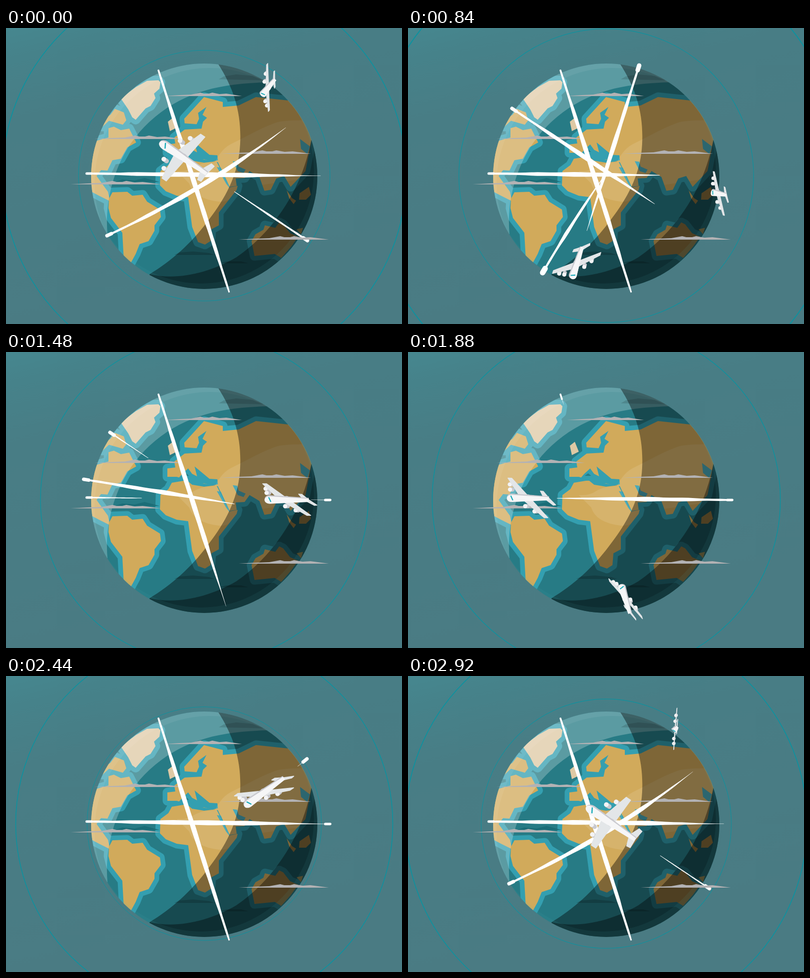
Write an HTML page that moves like this. It is 800 by 600 pixels and loops after 2.96 s.

```html
<!DOCTYPE html>
<html lang="en">
<head>
<meta charset="utf-8">
<title>Flights around the globe</title>
<style>
html, body { margin: 0; width: 100%; height: 100%; overflow: hidden; background: #487c84; }
svg { display: block; width: 100vw; height: 100vh; }
</style>
</head>
<body>
<svg viewBox="0 0 800 600">
  <defs>
    <linearGradient id="sky" gradientUnits="userSpaceOnUse" x1="0" y1="0" x2="145" y2="600">
      <stop offset="0" stop-color="#46878f"/>
      <stop offset=".1" stop-color="#46828a"/>
      <stop offset=".3" stop-color="#487d85"/>
      <stop offset="1" stop-color="#4a7b83"/>
    </linearGradient>
    <clipPath id="disc"><circle cx="400.5" cy="300.5" r="228.5"/></clipPath>
    <clipPath id="landClip"><use href="#eurasia"/><use href="#africa"/></clipPath>
    <path id="cloud" d="M0 8L35 6 62 5 84 1 92 3 104 3 112 1 129 4 145 3 160 5 182 8Z"/>
  </defs>
  <rect width="800" height="600" fill="url(#sky)"/>
  <g id="rings" fill="none" stroke="#0d929f"></g>
  <g clip-path="url(#disc)">
    <rect x="170" y="70" width="460" height="460" fill="#277b85"/>
    <g fill="#d1aa5b" stroke="#349fb0" stroke-width="19" stroke-linejoin="round">
      <path id="greenland" d="M285 107L308 106 312 110 310 123 299 133 302 142 292 158 282 163 262 186 255 181 247 165 232 143 262 120Z"/>
      <path id="arctic" d="M220 164L238 171 243 187 236 196 208 188 195 200 190 188 211 176Z"/>
      <path id="namerica" d="M207 203L218 200 232 207 249 204 263 232 245 242 232 265 215 268 205 289 192 288 183 300 206 332 210 351 188 340 160 325V235L207 222Z"/>
      <path id="samerica" d="M208 346L215 333 245 332 255 340 276 338 285 352 311 368 313 383 300 400V411L288 432 270 438 262 458 250 480 238 470 235 415 212 385 207 365Z"/>
      <path id="africa" d="M328 278L335 265 365 260 376 269 400 273 425 270 440 300 452 323 468 320 466 328 430 374V400L415 408 413 432 402 439 388 434 376 403 368 343 345 340 323 331 311 319 312 290Z"/>
      <path id="eurasia" d="M326 253V236L342 234 340 222 362 205 360 184 400 140 438 150V160L470 157 505 140 580 148 640 190V232L617 228 605 290 575 322 562 300 546 305 535 328 522 330 512 302 492 290 482 304 464 305 466 320 452 322 428 272 376 262 345 253Z"/>
      <path id="australia" d="M496 432L504 418 520 409 523 400 544 405 552 394 560 398 574 416 590 423 576 443 556 466 543 458 502 462Z"/>
    </g>
    <g fill="#d1aa5b">
      <use href="#arctic"/><use href="#namerica"/><use href="#samerica"/>
      <use href="#africa"/><use href="#eurasia"/><use href="#australia"/>
      <path d="M567 329L578 345 586 350 581 357 572 345ZM593 335L612 322 616 338 606 348 592 348ZM587 408L600 405 596 418Z"/>
      <path fill="#dec9a4" d="M337 182L345 202 331 209 327 190Z"/>
      <use href="#greenland" fill="#dec9a4"/>
    </g>
    <g fill="#349fb0">
      <path d="M405 160L388 172 390 184 385 195 358 193V206L395 204 398 190 406 182 397 176Z"/>
      <path d="M345 260L356 247 368 236 376 247 386 252 381 232 411 257 427 258 428 268 416 271 400 266 376 268 368 261Z"/>
      <path d="M426 282L434 283 453 326 445 316ZM458 270L467 271 470 281 484 287 480 294 468 290ZM594 225L614 240 609 256 596 245Z"/>
      <path fill="#277b85" d="M357 251L364 246 370 251Z"/>
    </g>
    <path clip-path="url(#landClip)" fill="#fff" fill-opacity=".1" d="M345 290Q365 292 380 282T422 272Q435 245 455 235T500 212 545 192 640 188V300L470 325Q455 355 430 352T390 340 370 315Z"/>
    <path fill="#1b6d77" d="M220 312L235 307 260 309 280 304 310 312Z"/>
    <path fill="#fff" fill-opacity=".24" d="M205 418C198 340 225 250 290 190S430 112 530 110V60H160V418Z"/>
    <path fill="#fff" fill-opacity=".06" fill-rule="evenodd" d="M150 60H650V560H150ZM179 314a233 233 0 0 1 466 0a233 233 0 0 1 -466 0Z"/>
    <path fill-opacity=".13" d="M430 104L440 98 465 94 498 97 520 106Z"/>
    <path fill-opacity=".4" d="M428 72C462 125 476 175 473 235C470 300 440 350 405 395C375 435 335 472 290 499V600H700V60H420Z"/>
    <path fill-opacity=".38" d="M617 225C600 320 545 410 465 465C410 497 345 512 290 499V600H700V225Z"/>
    <path fill="#4bb0b5" fill-opacity=".08" fill-rule="evenodd" d="M160 60H640V540H160ZM166 290a228 228 0 0 0 456 0a228 228 0 0 0 -456 0Z"/>
    <path fill-opacity=".18" d="M340 460L350 455 378 453 410 456 422 460ZM430 477L445 473 475 473 490 477Z"/>
  </g>
  <g fill="#b3b2b4">
    <use href="#cloud" transform="translate(321 130) scale(.855 1)"/>
    <use href="#cloud" transform="translate(179 217) scale(.98 1)"/>
    <use href="#cloud" transform="translate(131 309)"/>
    <use href="#cloud" transform="translate(434 247)"/>
  </g>
  <g id="trails" fill="#fff" stroke="#fff" stroke-linecap="round"></g>
  <use href="#cloud" transform="translate(470 421)" fill="#b3b2b4"/>
  <g id="planes"></g>
</svg>
<script>
const LOOP = 2960, STEP = 40;
const TRAIL_LAG = 80; // ms between a plane and the tip of its trail
const layer = id => document.getElementById(id);
const pt = (x, y) => x.toFixed(1) + ' ' + y.toFixed(1);
const mix = (a, b, k) => a + (b - a) * k;
const clamp = k => Math.max(0, Math.min(1, k));
const ease = k => (k = clamp(k), k * k * (3 - 2 * k));

// bow: sideways bend; wing: wing angle at both ends; pull: how late the trail's tail speeds up
const routes = [
  { from: [451, 536], to: [308, 86], bow: 0, start: 1800, flight: 460, fadeAt: 4420, fade: 440, pull: 1, wing: [58, 5], blob: 1.8 },
  { from: [655, 300], to: [163, 295], bow: 0, start: 1253, flight: 840, fadeAt: 2090, fade: 2560, pull: 3, wing: [209, 234], blob: 2.5 },
  { from: [608, 168], to: [204, 421], bow: -15, start: 2297, flight: 460, fadeAt: 2500, fade: 950, pull: 3, wing: [-22, 30], blob: 3.5 },
  { from: [609, 431], to: [210, 163], bow: 0, start: 2690, flight: 460, fadeAt: 3240, fade: 1400, pull: 1.4, wing: [-84, -24], blob: 3.5 },
  { from: [541, 106], to: [272, 496], bow: 9, start: 2905, flight: 460, fadeAt: 3365, fade: 720, pull: 1.3, wing: [97, 20], blob: 5.5 },
  { from: [467, 76], to: [327, 520], bow: 0, start: 340, flight: 620, fadeAt: 960, fade: 400, pull: 1, wing: [8, -28], blob: 4.5 },
  { from: [638, 337], to: [157, 258], bow: 0, start: 800, flight: 460, fadeAt: 1260, fade: 600, pull: 1, wing: [72, 130], blob: 3.5 },
];

// Point and unit tangent at fraction s of a route.
function along(r, s) {
  const [x0, y0] = r.from, dx = r.to[0] - x0, dy = r.to[1] - y0, len = Math.hypot(dx, dy);
  const lift = 4 * r.bow * s * (1 - s), slope = 4 * r.bow * (1 - 2 * s);
  const tx = dx - dy / len * slope, ty = dy + dx / len * slope, norm = Math.hypot(tx, ty);
  return { x: x0 + dx * s - dy / len * lift, y: y0 + dy * s + dx / len * lift, tx: tx / norm, ty: ty / norm, len };
}

function trail(r, t) {
  const head = ease((t - TRAIL_LAG - r.start) / r.flight);
  const tail = clamp((t - r.fadeAt) / r.fade) ** r.pull;
  if (head <= tail) return '';
  const left = [], right = [], n = 28;
  for (let i = 0; i <= n; i++) {
    const s = mix(tail, head, i / n), p = along(r, s);
    let w = 1.4 + 3.3 * Math.sin(Math.PI * s) + .35 * Math.sin(s * 41);
    if (head < 1) w *= Math.min(1, .1 + (head - s) / .4);
    if (tail > 0) w *= Math.min(1, .1 + (s - tail) / .32);
    left.push(pt(p.x - p.ty * w, p.y + p.tx * w));
    right.unshift(pt(p.x + p.ty * w, p.y - p.tx * w));
  }
  const blob = (s, dir) => {
    const p = along(r, s), k = dir * Math.min(10, p.len * (head - tail));
    return `<path d="M${pt(p.x, p.y)}l${pt(p.tx * k, p.ty * k)}" stroke-width="${r.blob * 2}"/>`;
  };
  return `<path stroke="none" d="M${left.concat(right).join('L')}Z"/>`
    + (tail < .01 && r.blob > 2 ? blob(0, 1) : '') + (head === 1 ? blob(1, -1) : '');
}

// The fuselage turns from edge-on to side-on and back while the wings roll.
function plane(r, t) {
  const u = (t - r.start) / r.flight;
  if (u <= 0 || u >= 1) return '';
  const { x, y, tx, ty } = along(r, ease(u)), side = Math.sin(Math.PI * u);
  const body = 60 * side, span = 40 + 20 * side, size = span / 55, h = 8.6 * size;
  const roll = mix(...r.wing, u) * Math.PI / 180, wx = span * Math.cos(roll), wy = span * Math.sin(roll);
  const local = (f, w, n = 0) => pt(x + tx * body * f + wx * w - ty * h * n, y + ty * body * f + wy * w + tx * h * n);
  const shape = pts => `<path d="M${pts.map(p => local(...p)).join('L')}Z" fill="#e3e6e8" stroke="#e3e6e8" stroke-width="${1.5 * size}" stroke-linejoin="round"/>`;
  const hull = (n, k, fill) => `<path fill="${fill}" d="M${local(-1, 0, n + .45 * k)}L${local(.75, 0, n + k)}C${local(1.06, 0, n + k)} ${local(1.06, 0, n - k)} ${local(.75, 0, n - k)}L${local(-1, 0, n - .45 * k)}Z"/>`;
  let out = '';
  for (const w of [-.68, -.42, .42, .68]) {
    const f = .82 * (1 - Math.abs(w));
    out += `<g stroke-linecap="round" stroke-width="${8.5 * size}"><path d="M${local(f, w)}L${local(f - .12, w)}" stroke="#c9c9cf"/>`
      + `<path d="M${local(f, w)}l.1 0" stroke="#f4f4f5"/></g>`;
  }
  for (const s of [-1, 1]) {
    out += shape([[.32, 0], [.08, s], [-.1, s], [-.1, 0]]);
    out += shape([[-.76, 0], [-.9, s * .36], [-1.03, s * .34], [-1, 0]]);
  }
  return out + `<circle cx="${x}" cy="${y}" r="${h * .85}" fill="#c9c9cf"/>`
    + hull(0, 1, '#c9c9cf') + hull(-Math.sign(tx) * -.15, .85, '#f6f6f7')
    + `<path d="M${local(.7, 0, -.6)}L${local(.8, 0, .5)}" stroke="#16a9b8" stroke-width="${2.2 * size}"/>`;
}

// Rings widen faster in each successive loop.
function ring(t) {
  const r = 254 + .033 * Math.min(0, t) + .052 * Math.max(0, Math.min(LOOP, t)) + .083 * Math.max(0, t - LOOP);
  return `<circle cx="400.5" cy="299.3" r="${r}" stroke-width="${r * .0042}"/>`;
}

function draw(t) {
  const each = shape => routes.map(r => shape(r, t) + shape(r, t + LOOP)).join('');
  layer('rings').innerHTML = [t - LOOP, t, t + LOOP].map(ring).join('');
  layer('trails').innerHTML = each(trail);
  layer('planes').innerHTML = each(plane);
}

const began = performance.now();
function tick() {
  const t = (performance.now() - began) % LOOP;
  draw(Math.floor(t / STEP) * STEP);
  requestAnimationFrame(tick);
}
tick();
</script>
</body>
</html>
```
